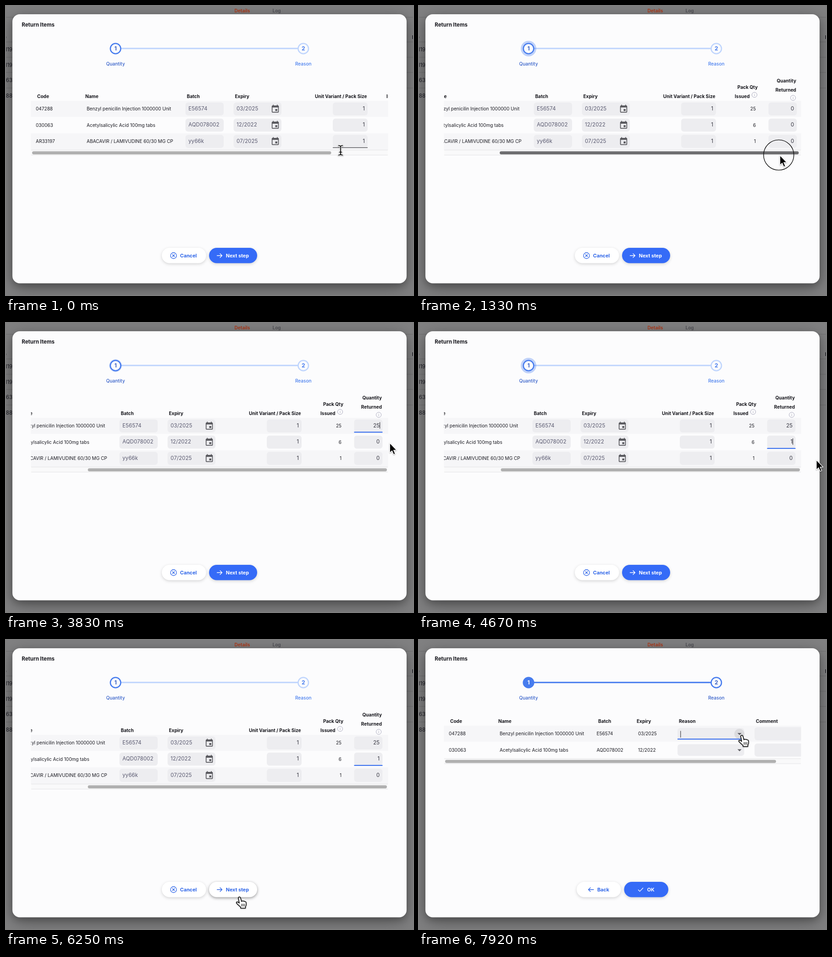
Write an HTML page that moves like this. It is 888 by 631 pixels and loops after 8000 ms.

```html
<!DOCTYPE html>
<html lang="en">
<head>
<meta charset="utf-8">
<title>Return Items</title>
<style>
  html, body { margin: 0; width: 100%; height: 100%; overflow: hidden; background: #828283; }
  svg { display: block; width: 100vw; height: 100vh; font: 10.05px Inter, sans-serif; fill: #1b1b22; }
  text { white-space: pre; }
  .bold { font-weight: 700; fill: #16161c; }
  .medium { font-weight: 500; }
  .title { font-size: 11.5px; }
  .field { font-size: 11.5px; letter-spacing: .1px; fill: #34343f; }
  .locked { fill: #5a5a70; }
  .end { text-anchor: end; }
  .mid { text-anchor: middle; }
  .button { font-size: 10.75px; font-weight: 700; }
  .box { fill: #ededf0; }
  .icon { fill: none; stroke-width: 1.3; stroke-linecap: round; stroke-linejoin: round; }
  .info { fill: none; stroke: #9a9ab0; stroke-width: .8; }
  .raised { filter: drop-shadow(0 2px 3px rgba(0,0,0,.16)); }
  .hover .face { fill: #fff; filter: drop-shadow(0 2px 3px rgba(0,0,0,.4)); }
  .primary { --ink: #fff; }
  .primary.hover, .plain { --ink: #2f66e8; }
  .button, .digit { fill: var(--ink); }
  .icon { stroke: var(--ink); }
  .digit { font-size: 12px; font-weight: 700; }
  #dialog { fill: #fcfcfd; filter: drop-shadow(0 6px 8px rgba(0,0,0,.25)) drop-shadow(0 10px 22px rgba(0,0,0,.3)); }
  #cursor { filter: drop-shadow(0 1px 1px rgba(0,0,0,.35)); }
</style>
</head>
<body>
<svg id="stage" viewBox="0 0 888 631"></svg>
<script>
const LOOP = 8000, STEP_CHANGE = 6580, ROW = 35.4;
const BLUE = '#477cee', PALE = '#bfd5fd', STRONG = '#2f68ee';
const items = [
  ['047288', 'Benzyl penicilin Injection 1000000 Unit', 'E56574', '03/2025', 25],
  ['030063', 'Acetylsalicylic Acid 100mg tabs', 'AQD078002', '12/2022', 6],
  ['AR33197', 'ABACAVIR / LAMIVUDINE 60/30 MG CP', 'yy66k', '07/2025', 1],
];

// Markup helpers
const text = (x, y, str, cls = '', attrs = '') => `<text x="${x}" y="${y}" class="${cls}" ${attrs}>${str}</text>`;
const rect = (x, y, w, h, r, attrs = '') => `<rect x="${x}" y="${y}" width="${w}" height="${h}" rx="${r}" ${attrs}/>`;
const box = (x, y, w, h = 28.5) => rect(x, y, w, h, 6, 'class="box"');
const header = (x, str, y = 200.7, cls = '') => text(x, y, str, 'bold ' + cls);
const icon = d => `<path class="icon" d="${d}"/>`;
const info = (x, y) => `<g class="info"><circle cx="${x}" cy="${y}" r="5.6"/><path d="M${x} ${y - .8}v3.4M${x} ${y - 2.8}v1"/></g>`;
const calendar = y => `<path fill="#58585d" transform="translate(577.2 ${y}) scale(.86)" d="M17 12h-5v5h5zM16 1v2H8V1H6v2H5q-2 0-2 2v14q0 2 2 2h14q2 0 2-2V5q0-2-2-2h-1V1zm3 18H5V8h14z"/>`;
const button = (id, cls, x, w, label, labelX, d) => `<g id="${id}" class="${cls}">
  ${rect(x, 528, w, 33.5, 16.75, `class="face raised" fill="${cls === 'plain' ? '#fff' : '#356bf7'}"`)}
  ${icon(d)}${text(labelX, 549, label, 'button')}</g>`;
const track = (y, id, width) => rect(54.5, y, 779, 11, 0, 'fill="#f9f9fa"') +
  `<path d="M54.5 ${y}h779M54.5 ${y + 11}h779" stroke="#e4e4e6"/>` +
  rect(57, y + 2.7, width, 6.8, 3.4, `id="${id}" fill="#b0b0b0"`);
const stepMark = (n, x, label) => `<circle id="ring${n}" cx="${x}" cy="93" r="11.3" stroke-width="2.5"/>` +
  text(x, 97.3, n, 'digit mid', `id="digit${n}"`) + text(x, 129.7, label, 'medium mid', `id="label${n}"`);

const background = `
  <path d="M0 24.5h888M0 78.5h888M0 112h888M0 145h888M0 179h888" stroke="#000" stroke-opacity=".14"/>
  ${text(498.5, 13.8, 'Details', 'bold', 'style="fill:#ae3c1d"')}
  ${text(581.5, 13.8, 'Log', 'bold', 'style="fill:#55555a"')}
  ${text(1, 71.5, 'e', 'bold end')}${text(886, 71.5, 'I', 'bold')}
  ${['119', '119', '063', '288'].map((code, i) => text(14, 99 + 33.5 * i, code, 'title end')).join('')}`;

const quantityRow = ([code, name, batch, expiry, issued], i) => {
  const dy = ROW * i, base = 228.2 + dy, fieldBase = 227.7 + dy, top = 210.4 + dy;
  return text(65, base, code) + text(176, base, name) +
    box(391.5, top, 83.5) + text(398, fieldBase, batch, 'field locked') +
    box(496.5, top, 104.5) + text(503, fieldBase, expiry, 'field locked') + calendar(214.6 + dy) +
    box(713, top, 76) + text(783, fieldBase, '1', 'field end') +
    text(876, base, issued, 'end') + box(903.5, top, 62) +
    rect(952, 216 + dy, 7.6, 15, 0, `id="selection${i}" fill="#b3d0fb"`) +
    text(959.3, fieldBase, '0', 'field end', `id="value${i}"`) +
    rect(959.2, 216.5 + dy, 1, 14, 0, `id="caret${i}"`) +
    rect(903.5, 237.4 + dy, 62, 2, 0, `id="focus${i}" fill="${STRONG}"`);
};

const quantityStep = `<g id="step1">
  <g clip-path="url(#tableClip)">
    ${rect(54, 207, 780, 35, 0, 'fill="#f6f6f8"')}${rect(54, 278, 780, 36, 0, 'fill="#f6f6f8"')}
    <g id="columns">
      ${header(68, 'Code')}${header(173, 'Name')}${header(394.5, 'Batch')}${header(499.5, 'Expiry')}
      ${header(787.5, 'Unit Variant / Pack Size', 200.7, 'end')}
      ${header(880, 'Pack Qty', 180.6, 'end')}${header(830, 'Issued')}${info(873, 194)}
      ${header(964, 'Quantity', 167.2, 'end')}${header(964, 'Returned', 187.2, 'end')}${info(957.2, 200.5)}
      ${items.map(quantityRow).join('')}
      ${rect(713, 308.6, 76, 1.4, 0, 'id="fieldHover" fill="#55555a"')}
    </g>
    ${track(314.5, 'scrollBar', 652.5)}
  </g>
  ${button('cancel', 'plain', 340, 96.5, 'Cancel', 379.7, 'M372 545a6.5 6.5 0 1 1-13 0a6.5 6.5 0 1 1 13 0M363.2 542.7l4.6 4.6M367.8 542.7l-4.6 4.6')}
  ${button('next', 'primary', 443, 105, 'Next step', 479.7, 'M460.5 545h11M467 540.8l4.4 4.2l-4.4 4.2')}
</g>`;

const reasonRow = ([code, name, batch, expiry], i) => {
  const dy = ROW * i, base = 208.2 + dy;
  return text(65, base, code) + text(176, base, name) + text(387.5, base, batch) + text(478, base, expiry) +
    box(564, 192 + dy, 145.5, 25.5) + (i ? '' : '<circle id="arrowHover" cx="699" cy="205" r="11" fill="#dbdbde"/>') +
    `<path d="M694.8 ${203 + dy}h9l-4.5 4.5z" fill="#606066"/>` + box(732, 190.5 + dy, 160);
};

const reasonStep = `<g id="step2">
  <g clip-path="url(#tableClip)">
    ${rect(54, 187, 780, 35, 0, 'fill="#f6f6f8"')}
    ${['Code', 'Name', 'Batch', 'Expiry', 'Reason', 'Comment'].map((h, i) => header([68, 173, 391, 475, 567, 735][i], h, 180.7)).join('')}
    ${items.slice(0, 2).map(reasonRow).join('')}
    ${rect(564, 215.4, 145.5, 2, 0, `id="reasonFocus" fill="${STRONG}"`)}
    ${rect(570.3, 198.5, 1, 14.5, 0, 'id="reasonCaret"')}
    ${track(259, 'reasonBar', 722)}
  </g>
  ${button('back', 'plain', 344, 96.5, 'Back', 389, 'M381 545h-11M374 540.8l-4.4 4.2l4.4 4.2')}
  ${button('ok', 'primary', 447.5, 96.5, 'OK', 497.7, 'M478.5 545.5l3.2 3.4l7-7.4')}
</g>`;

const cursors = `
  <circle id="press" r="33" fill="none" stroke="#111" stroke-width="1.4"/>
  <g id="cursor" stroke-linejoin="round">
    <path id="arrow" d="M0 0V21.5L4.8 17L8.4 25L11.8 23.5L8.3 15.6H14.8Z" fill="#000" stroke="#fff" stroke-width="1.3"/>
    <g id="beam" fill="none" stroke-linecap="round">
      ${[['#fff', 3.4], ['#000', 1.7]].map(([c, w]) => `<path stroke="${c}" stroke-width="${w}" d="M-4.5-10.5Q0-10.5 0-7.5Q0-10.5 4.5-10.5M0-7.5V7.5M-4.5 10.5Q0 10.5 0 7.5Q0 10.5 4.5 10.5M-2.5 4H2.5"/>`).join('')}
    </g>
    <g id="hand" fill="#fff" stroke="#000" stroke-width="1.5" stroke-linecap="round">
      <path d="M-3 2.5Q-3 0-.5 0Q1.3 .2 2 3L4 10Q5.5 7.5 7.5 9.5Q9.3 8 11 10.2Q13.7 9.7 14 13V17Q13.8 19.5 12.5 21V24.5H2V22Q-3 18-7 13.5Q-8 11-5.5 10.8Q-4 11-1 13.5Z"/>
      <path d="M4.3 15.2v5M7.3 15.2v5M10.3 15.2v5" stroke-width="1.1"/>
    </g>
  </g>`;

document.getElementById('stage').innerHTML = `
  <clipPath id="tableClip">${rect(54.5, 140, 779, 200, 0)}</clipPath>
  ${background}
  ${rect(14, 18, 860, 587.5, 16, 'id="dialog"')}
  ${text(34.3, 45, 'Return Items', 'bold title')}
  <path id="stepLine" d="M251 92.7H637" stroke-width="3"/>
  <circle id="halo" cx="239" cy="93" fill="${BLUE}" fill-opacity=".33"/>
  ${stepMark(1, 239, 'Quantity')}${stepMark(2, 648.7, 'Reason')}
  ${quantityStep}${reasonStep}${cursors}`;

const el = {};
document.querySelectorAll('[id]').forEach(node => el[node.id] = node);
const set = (id, attrs) => { for (const key in attrs) el[id].setAttribute(key, attrs[key]); };
const show = (id, on) => el[id].style.display = on ? '' : 'none';
const within = (t, ...spans) => spans.some(([from, to]) => t >= from && t < to);

// Keyframes: [time, ...values]
const scrollKeys = [[480, 0], [920, 64], [1330, 141], [1400, 144]];
const cursorKeys = [
  [80, 730, 315], [400, 676, 322], [480, 676, 322], [920, 729, 323.5], [1330, 787.5, 326], [1420, 791, 326],
  [1670, 799, 290], [2000, 803, 228], [2250, 804, 227], [2500, 846, 246], [3000, 847, 249], [3420, 848, 250],
  [3670, 861, 262], [4000, 812, 262], [4170, 812, 263], [4400, 860, 290], [4670, 867, 299], [4920, 873, 304],
  [5170, 868, 304], [5830, 640, 500], [6080, 530, 575], [6250, 510, 561], [6720, 510, 560], [7450, 685, 215],
  [7750, 705, 208],
];
const smooth = u => u * u * (3 - 2 * u);
function sample(keys, t, ease = u => u) {
  const next = keys.findIndex(key => key[0] > t);
  if (next < 0) return keys.at(-1).slice(1);
  if (next === 0) return keys[0].slice(1);
  const a = keys[next - 1], b = keys[next], u = ease((t - a[0]) / (b[0] - a[0]));
  return a.slice(1).map((v, i) => v + (b[i + 1] - v) * u);
}

function drawStepper(t) {
  const done = t >= STEP_CHANGE;
  set('stepLine', { stroke: done ? BLUE : PALE });
  set('ring1', { stroke: BLUE, fill: done ? BLUE : '#fcfcfd' });
  set('ring2', { stroke: done ? BLUE : PALE, fill: '#fcfcfd' });
  el.digit1.style.fill = done ? '#fff' : '#3a62c4';
  el.digit2.style.fill = done ? '#3a62c4' : BLUE;
  el.label1.style.fill = '#2f5bc8';
  el.label2.style.fill = done ? '#2f5bc8' : '#437bee';
  const pulse = t < 7200 ? Math.max(0, Math.cos(2 * Math.PI * (t - 1390) / 1113)) : 0;
  set('halo', { r: 12 + 5.2 * pulse });
}

function drawQuantities(t) {
  const [scroll] = sample(scrollKeys, t);
  set('columns', { transform: `translate(${-scroll} 0)` });
  set('scrollBar', { x: 57 + scroll * .844, fill: within(t, [330, 1520]) ? '#6e6e70' : '#b0b0b0' });
  show('fieldHover', t < 200);
  const typed = [t < 3500 ? '0' : t < 3670 ? '2' : '25', t < 4580 ? '0' : '1', '0'];
  const focus = [[2170, 4080], [4080, STEP_CHANGE], [LOOP, LOOP]];
  const typing = [3500, 4580, LOOP];
  typed.forEach((value, i) => {
    const focused = within(t, focus[i]);
    el['value' + i].textContent = value;
    show('focus' + i, focused);
    show('selection' + i, focused && t < typing[i]);
    show('caret' + i, focused && t >= typing[i] && (t - typing[i]) % 1000 < 500);
  });
}

function drawReasons(t) {
  show('reasonFocus', t >= 7250);
  show('reasonCaret', t >= 7250 && (t - 7250) % 1000 > 500 || within(t, [7250, 7500]));
  show('arrowHover', t >= 7550);
}

function drawCursor(t) {
  const [x, y] = sample(cursorKeys, t, t > 480 && t < 1420 ? undefined : smooth);
  const hand = within(t, [6170, 6830], [7550, LOOP]);
  const beam = within(t, [0, 200], [1830, 2330], [3920, 4250], [7380, 7550]);
  set('cursor', { transform: `translate(${x} ${y})` });
  set('press', { cx: x - 2.7, cy: y - .6 });
  show('hand', hand);
  show('beam', beam);
  show('arrow', !hand && !beam);
  show('press', within(t, [480, 1420], [2120, 2250], [4040, 4170], [6500, 6620]));
}

function render(t) {
  show('step1', t < STEP_CHANGE);
  show('step2', t >= STEP_CHANGE);
  const hovered = within(t, [6170, 6800]);
  el.next.classList.toggle('hover', hovered);
  el.ok.classList.toggle('hover', hovered);
  drawStepper(t);
  drawQuantities(t);
  drawReasons(t);
  drawCursor(t);
}

const start = performance.now();
function tick() {
  render((performance.now() - start) % LOOP);
  requestAnimationFrame(tick);
}
tick();
</script>
</body>
</html>
```
